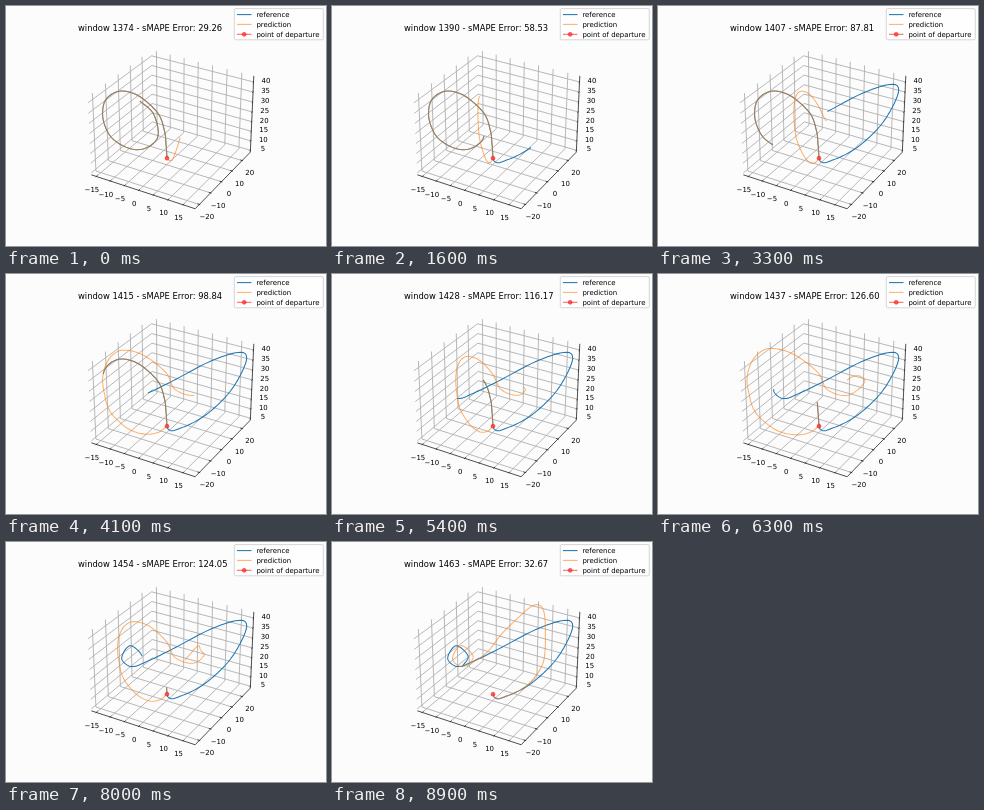
An HTML page for the animation above (9 s loop, 320x240 px).

```html
<!DOCTYPE html>
<html lang="en">
<head>
<meta charset="utf-8">
<title>Forecast window</title>
<style>
  html, body { margin: 0; width: 100%; height: 100%; overflow: hidden; background: #fcfcfc; }
  svg { display: block; width: 320px; height: 240px; font: 6.94px "DejaVu Sans", sans-serif; }
  polyline, line { fill: none; stroke-width: 1.05; stroke-linejoin: round; }
  .grid { stroke: #b0b0b0; stroke-width: .9; }
  .axis { stroke: #222; stroke-width: .8; }
  .ref { stroke: #1f77b4; }
  .pred { stroke: #ff7f0e; stroke-opacity: .6; }
  .mid { text-anchor: middle; }
  .dot { fill: #f33; fill-opacity: .75; stroke: #f22; stroke-opacity: .75; stroke-width: .9; }
</style>
</head>
<body>
<svg id="stage" viewBox="0 0 320 240">
  <g id="axes"></g>
  <polyline id="ref" class="ref"/>
  <polyline id="pred" class="pred"/>
  <circle class="dot" cx="161" cy="152.2" r="1.9"/>
  <text id="title" x="72" y="25" font-size="8.38"></text>
  <rect x="228.3" y="2.6" width="89" height="31.2" rx="1.4" fill="#fff" fill-opacity=".8" stroke="#ccc" stroke-opacity=".8"/>
  <line x1="231" x2="245.5" y1="8.6" y2="8.6" class="ref"/>
  <line x1="231" x2="245.5" y1="18.4" y2="18.4" class="pred"/>
  <line x1="231" x2="245.5" y1="28.3" y2="28.3" stroke="#f33" stroke-opacity=".75"/>
  <circle class="dot" cx="238.2" cy="28.3" r="1.9"/>
  <text x="250.4" y="10.9">reference</text>
  <text x="250.4" y="20.7">prediction</text>
  <text x="250.4" y="30.7">point of departure</text>
</svg>
<script>
const $ = id => document.getElementById(id);
const COUNT = 90, STEP = 100, DEPART = 89;

// ---- 3D axes: perspective view, elevation 30, azimuth -60 ----
const LIMITS = [[-16.8, 19], [-23.6, 28.3], [4, 43]];
const SIZE = [1.1905, 1.1905, 0.8929];

function project(p) {
  const [x, y, z] = p.map((v, i) =>
    ((v - LIMITS[i][0]) / (LIMITS[i][1] - LIMITS[i][0]) - 0.5) * SIZE[i]);
  const scale = 999 / (10 - 0.433 * x + 0.75 * y - 0.5 * z);
  return [166.3 + scale * (0.866 * x + 0.5 * y),
          119.5 - scale * (-0.25 * x + 0.433 * y + 0.866 * z)];
}

const range = (n, f) => Array.from({ length: n }, (_, i) => f(i));
const text = pts => pts.map(p => p.map(v => v.toFixed(2)).join()).join(" ");

function drawAxes() {
  const [[x0, x1], [y0, y1], [z0, z1]] = LIMITS;
  const ticks = (from, to, by) => range((to - from) / by + 1, i => from + i * by);
  const poly = (cls, ...pts) => `<polyline class="${cls}" points="${text(pts.map(project))}"/>`;
  let grid = "", front = "";

  const tick = (v, at, along, sign, dx, dy) => {
    const shift = f => at.map((c, i) =>
      i === along ? c + sign * f * (LIMITS[i][1] - LIMITS[i][0]) / 12 : c);
    const [px, py] = project(at);
    front += poly("axis", shift(0.1), shift(-0.2)) +
      `<text class="mid" x="${px + dx}" y="${py + dy + 2.5}">${String(v).replace("-", "\u2212")}</text>`;
  };

  for (const x of ticks(-15, 15, 5)) {
    grid += poly("grid", [x, y0, z0], [x, y1, z0], [x, y1, z1]);
    tick(x, [x, y0, z0], 1, -1, -4.4, 13);
  }
  for (const y of ticks(-20, 20, 10)) {
    grid += poly("grid", [x1, y, z0], [x0, y, z0], [x0, y, z1]);
    tick(y, [x1, y, z0], 0, 1, 7.5, 12.2);
  }
  for (const z of ticks(5, 40, 5)) {
    grid += poly("grid", [x0, y0, z], [x0, y1, z], [x1, y1, z]);
    tick(z, [x1, y1, z], 1, 1, 12.5, -1.4);
  }
  front += poly("axis", [x0, y0, z0], [x1, y0, z0], [x1, y1, z0], [x1, y1, z1]);
  $("axes").innerHTML = grid + front;
}

// ---- smooth curve through keys [t, ...values] ----
function curve(...keys) {
  const last = keys.length - 1;
  const slope = (i, c) => {
    const a = keys[Math.max(i - 1, 0)], b = keys[Math.min(i + 1, last)];
    return (b[c] - a[c]) / (b[0] - a[0]);
  };
  return t => {
    let i = 0;
    while (i < last - 1 && t > keys[i + 1][0]) i++;
    const a = keys[i], b = keys[i + 1], h = b[0] - a[0], u = (t - a[0]) / h;
    return a.slice(1).map((v, j) => v + (b[j + 1] - v) * u * u * (3 - 2 * u) +
      h * u * (1 - u) * (slope(i, j + 1) * (1 - u) - slope(i + 1, j + 1) * u));
  };
}

// reference: step, x, y
const past = curve(
  [0, 134, 95], [8, 147.5, 108], [16, 152, 130], [23, 141, 141.5], [30, 124.5, 142.7],
  [36, 105, 131], [39, 97, 113], [42, 99, 95], [46, 113, 85.3], [50, 132, 89.5],
  [54, 151, 106], [60, 158, 123], [71, 160, 138], [89, 161, 152]);
const future = curve(
  [0, 161, 152], [3, 162.5, 155.4], [8, 169.5, 156], [16, 199, 141.5], [20, 224.5, 117],
  [24, 240.3, 87], [26.5, 235, 78.2], [30, 205, 87], [33, 169.5, 105.5], [41, 142, 119],
  [54, 125, 124.5], [62, 115.7, 116.5], [71, 124, 103.7], [80, 136, 114], [89, 130, 125]);
const truth = n => n <= DEPART ? past(n) : future(n - DEPART);

// forecast into the left lobe: step, x, y, and how x and y grow with the lobe's width
const lobe = curve(
  [0, 161, 152, 0, 0], [2, 161, 155, -0.13, 0.05], [4.5, 161, 155, -0.35, 0.08],
  [7, 161, 146, -0.62, 0.13], [9, 161, 133, -0.87, 0.1], [14, 161, 119, -0.98, 0],
  [20, 161, 101, -1, 0], [25, 161, 92, -0.9, -0.12], [28, 161, 91, -0.71, -0.23],
  [32, 161, 93, -0.38, -0.19], [37, 161, 101, -0.02, -0.04], [42, 168.5, 115, 0, 0],
  [50, 180, 121.3, 0.13, 0], [60, 179, 125, 0.39, -0.24], [64, 180, 122, 0.3, -0.28],
  [70, 192, 104, 0, 0], [80, 179, 118, 0, 0]);
const LOBE_END = 80, LOBE_LEAD = 9;

// window: error, lobe width
const state = curve(
  [0, 29.26, -15], [16, 58.53, 15], [33, 87.81, 25], [41, 98.84, 64],
  [54, 116.17, 37], [66, 130, 82], [71, 135.75, 75.5], [83, 119.6, 40]);

// forecast of the true course: the right turn is tighter and higher, the last loop shifted
const bump = (m, at, width) => Math.exp(-(((m - at) / width) ** 2));
function follow(m) {
  const [x, y] = future(m);
  return [x - 28 * bump(m, 25, 5.5) + 5 / (1 + Math.exp((50 - m) / 4)),
          y - 18 * bump(m, 29, 5)];
}

const FLIP = 84;
function predict(k) {
  if (k >= FLIP) return { error: 32.67 + 1.1 * (DEPART - k), ahead: range(2 * k + 1, j => follow(j / 2)) };
  const [error, width] = state(k);
  const span = Math.min(k + LOBE_LEAD, LOBE_END);
  const ahead = range(2 * span + 1, j => {
    const [x, y, gx, gy] = lobe(j / 2);
    return [x + gx * width, y + gy * width];
  });
  return { error, ahead };
}

function draw(k) {
  const { error, ahead } = predict(k);
  const course = n => range(n, j => truth(k + j / 2));
  $("ref").setAttribute("points", text(course(2 * DEPART + 1)));
  $("pred").setAttribute("points", text([...course(2 * (DEPART - k)), ...ahead]));
  $("title").textContent = `window ${1374 + k} - sMAPE Error: ${error.toFixed(2)}`;
}

drawAxes();
const start = performance.now();
let shown = -1;
function tickFrame() {
  const k = Math.floor((performance.now() - start) / STEP) % COUNT;
  if (k !== shown) draw(shown = k);
  requestAnimationFrame(tickFrame);
}
tickFrame();
</script>
</body>
</html>
```
